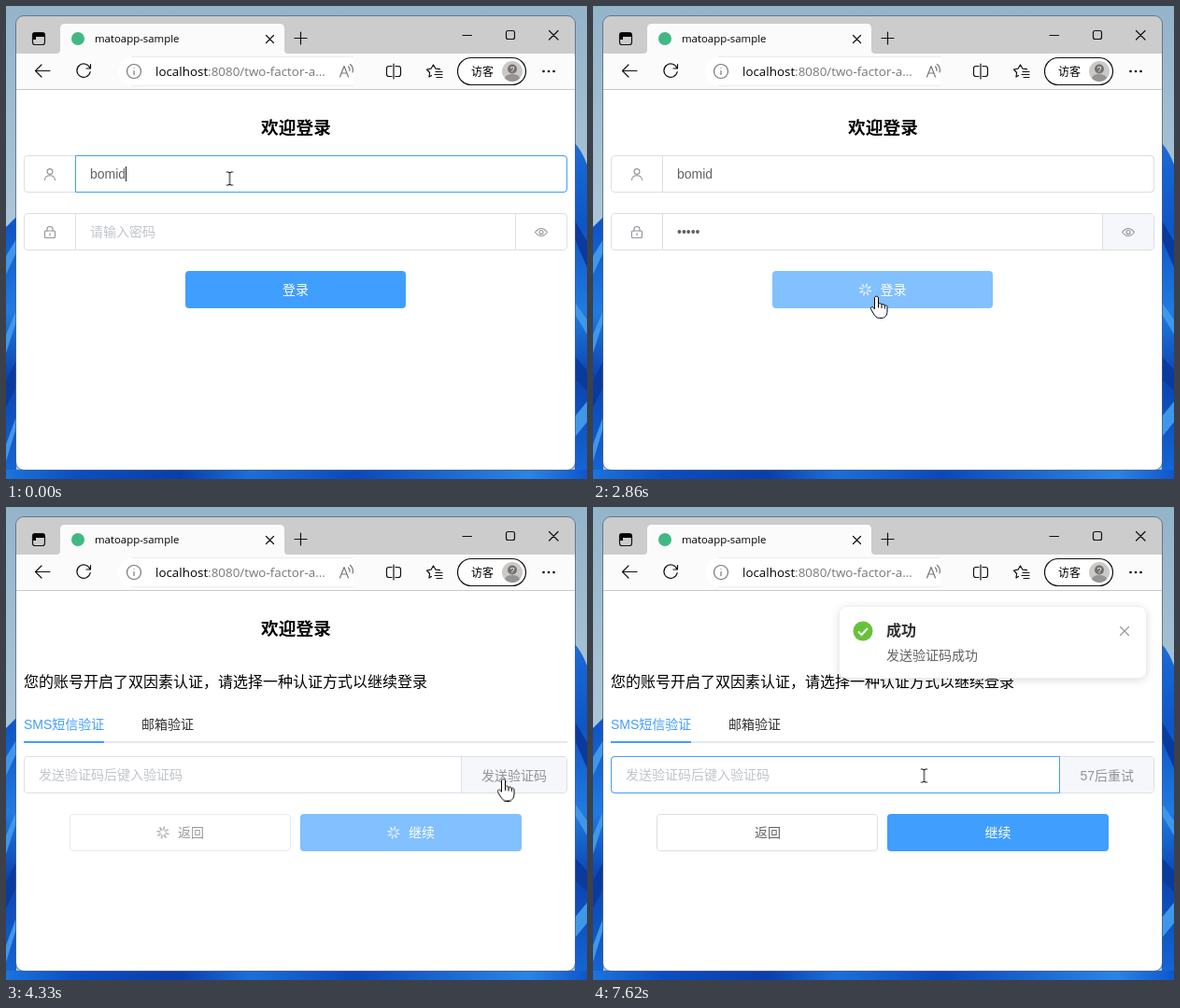
An HTML page that plays this animation: 622 px wide and 507 px high, repeating every 8 s.

```html
<!DOCTYPE html>
<html lang="zh-CN">
<head>
<meta charset="utf-8">
<title>Two-factor login</title>
<style>
  html, body { margin: 0; width: 100%; height: 100%; overflow: hidden; }
  svg { display: block; width: 622px; height: 507px; }
  text { font: 14px "Liberation Sans", "Noto Sans CJK SC", "Noto Sans CJK JP", sans-serif; white-space: pre; }
  .ui { font-family: "Open Sans", "Noto Sans CJK SC", sans-serif; }
  .line { fill: none; stroke: #111; stroke-width: 1.2; stroke-linecap: round; stroke-linejoin: round; }
  .soft { stroke: #777; }
  .icon { fill: none; stroke: #909399; stroke-width: 1.1; stroke-linecap: round; stroke-linejoin: round; }
  .box { fill: #fff; stroke: #dcdfe6; }
  .blue { fill: #409eff; }
  .focus { fill: none; stroke: #409eff; }
  .caret { fill: #222; }
  .hint { fill: #c0c4cc; }
  .text { fill: #606266; }
  .muted { fill: #909399; }
  .white { fill: #fff; }
  .pointer { fill: #fff; stroke: #000; stroke-linejoin: round; }
</style>
</head>
<body>
<svg viewBox="0 0 622 507" xmlns="http://www.w3.org/2000/svg">
  <defs>
    <linearGradient id="sky" x2="0" y2="1">
      <stop stop-color="#94b4ca"/><stop offset=".45" stop-color="#aac5d7"/>
    </linearGradient>
    <linearGradient id="petal" x2="0" y2="1">
      <stop stop-color="#1a6bd8"/><stop offset=".25" stop-color="#0d55c8"/><stop offset=".5" stop-color="#1f7be2"/>
      <stop offset=".7" stop-color="#0a43b2"/><stop offset="1" stop-color="#1568d8"/>
    </linearGradient>
    <linearGradient id="floor">
      <stop stop-color="#1b74dd"/><stop offset=".12" stop-color="#0b4ec3"/><stop offset=".3" stop-color="#0a3eab"/>
      <stop offset=".42" stop-color="#1b6fdb"/><stop offset=".6" stop-color="#0b48bb"/>
      <stop offset=".9" stop-color="#2a84e6"/><stop offset="1" stop-color="#0f56ca"/>
    </linearGradient>
    <filter id="shade" x="-10%" y="-25%" width="120%" height="160%">
      <feDropShadow dx="0" dy="2" stdDeviation="4" flood-opacity=".13"/>
    </filter>
    <clipPath id="frame"><rect x="11" y="11" width="598" height="486" rx="8"/></clipPath>
    <path id="spokes" d="M0-3V-6M2.1-2.1 4.3-4.3M3 0H6M2.1 2.1 4.3 4.3M0 3V6M-2.1 2.1-4.3 4.3M-3 0H-6M-2.1-2.1-4.3-4.3" stroke-width="1.3" stroke-linecap="round"/>
  </defs>

  <!-- desktop -->
  <rect width="622" height="507" fill="url(#sky)"/>
  <path fill="url(#petal)" d="M0 237 11 226V507H0ZM609 147Q617 156 622 170V507H609Z"/>
  <path fill="#3f97ea" d="M0 268 11 250V264L0 288ZM0 352 11 326V338L0 372ZM0 470 11 440V452L0 488ZM609 318 622 336V352L609 330ZM609 440 622 424V446L609 462Z"/>
  <path fill="#083a9f" d="M0 402 11 380V408L0 430ZM609 230 622 252V280L609 250ZM609 376 622 390V412L609 400Z"/>
  <rect y="497" width="622" height="10" fill="url(#floor)"/>

  <!-- browser window -->
  <g clip-path="url(#frame)">
    <rect x="11" y="11" width="598" height="486" fill="#fff"/>
    <rect x="11" y="11" width="598" height="40" fill="#cccccc"/>
    <path fill="#fbfbfb" d="M11 51H54Q58 51 58 47V24Q58 19 63 19H293Q298 19 298 24V47Q298 51 302 51H609V90H11Z"/>
    <path fill="#fff" d="M136 54H372V86H136A16 16 0 0 1 136 54Z"/>
    <path stroke="#ececec" d="M134 54.5H372M134 85.5H372"/>
    <path stroke="#c9c9c9" d="M11 89.5H609"/>
    <rect class="line" x="28.5" y="28.5" width="13" height="13" rx="2.5"/>
    <path d="M29 29H41V33H29ZM29 32H32V36H29Z"/>
    <circle cx="77" cy="35" r="7" fill="#41b883"/>
    <text class="ui" x="95" y="39" style="font-size:11.4px">matoapp-sample</text>
    <path class="line" d="M278.5 31.5 286.5 39.5M286.5 31.5 278.5 39.5M309 34.5H322M315.5 28V41"/>
    <path class="line" stroke-width="1" d="M489 31.5H498.500M581.500 26.500 591 36M591 26.500 581.500 36"/>
    <rect class="line" x="535.500" y="26.500" width="9" height="9" rx="2"/>
    <path class="line" d="M47 69.500H31.500M38 63 31.500 69.500 38 76"/>
    <path class="line" d="M90 67A7.200 7.200 0 1 0 90.200 70.500M90.500 62.500V67H86"/>
    <circle class="line soft" cx="137" cy="70" r="7.500"/>
    <path class="line soft" d="M137 69.500V73.500M137 66.500V66.600"/>
    <text class="ui" x="160" y="75" style="font-size:13.4px">localhost<tspan fill="#777">:8080/two-factor-a...</tspan></text>
    <path class="line soft" d="M357.500 76 362 64.500 366.500 76M359 72H365M366.500 65Q368.500 67 368 69.500M368.500 62.500Q372.500 66 371 71"/>
    <path class="line" d="M413 64.500H410Q407.500 64.500 407.500 67V73Q407.500 75.500 410 75.500H413M417 64.500H420Q422.500 64.500 422.500 67V73Q422.500 75.500 420 75.500H417M415 62V78"/>
    <path class="line" d="M455.500 74.500 453 76 453.600 71.500 450.500 68 455 67.200 457.500 63 460 67.200 464.500 67.700M460 70.500H467M459 73.500H467M461 76.500H467"/>
    <rect class="line" x="483.500" y="55.500" width="73" height="29" rx="14.500" style="fill:#fff"/>
    <text class="ui" x="498" y="74.500" style="font-size:12px">访客</text>
    <circle cx="542" cy="70" r="11" fill="#cbc9c7"/>
    <path fill="#969492" d="M534 77.500Q535 73 542 73T550 77.500A11 11 0 0 1 534 77.500Z"/>
    <circle cx="542" cy="67.500" r="5" fill="#75716e"/>
    <text class="white" x="542" y="71" text-anchor="middle" style="font-size:9px">?</text>
    <circle cx="575.500" cy="70" r="1.300"/><circle cx="581" cy="70" r="1.300"/><circle cx="586.500" cy="70" r="1.300"/>

    <text x="310.500" y="137" text-anchor="middle" style="font-size:18.72px;font-weight:700">欢迎登录</text>

    <!-- login form -->
    <g id="login">
      <rect class="box" x="19.500" y="160.500" width="581" height="39" rx="3.500"/>
      <rect class="box" x="19.500" y="222.500" width="581" height="39" rx="3.500"/>
      <path id="eyeCell" fill="#f5f7fa" d="M546 223H597Q600 223 600 226V258Q600 261 597 261H546Z"/>
      <path stroke="#dcdfe6" d="M74.500 161V199M74.500 223V261M545.500 223V261"/>
      <path id="userBox" class="focus" d="M74.500 160.500H597Q600.500 160.500 600.500 164V196Q600.500 199.500 597 199.500H74.500Z"/>
      <rect id="passBox" class="focus" x="74.500" y="222.500" width="471" height="39"/>
      <g class="icon">
        <circle cx="47" cy="177.500" r="2.900"/><path d="M41.500 186.500Q42 181.800 47 181.800T52.500 186.500"/>
        <rect x="41.500" y="241" width="11" height="7.500" rx="1"/><path d="M44 241V239Q44 236.500 47 236.500T50 239V241M47 243.500V246"/>
        <path d="M566.500 242.500Q573 234.500 579.500 242.500Q573 250.500 566.500 242.500Z"/><circle cx="573" cy="242.500" r="2"/>
      </g>
      <text class="text" x="90" y="185">bomid</text>
      <rect id="userCaret" class="caret" x="128" y="172" width="1" height="16"/>
      <text id="passHint" class="hint" x="90" y="247">请输入密码</text>
      <g id="dots" class="text"></g>
      <rect id="passCaret" class="caret" x="90" y="234" width="1" height="16"/>
      <rect id="loginBtn" class="blue" x="192" y="284" width="236" height="40" rx="4"/>
      <text id="loginText" class="white" x="310" y="309" text-anchor="middle">登录</text>
      <g id="loginBusy">
        <text class="white" x="307.500" y="309">登录</text>
        <g transform="translate(291.500 304)"><use class="spin" href="#spokes" stroke="#fff"/></g>
        <rect x="191" y="283" width="238" height="42" rx="4" fill="#fff" opacity=".35"/>
      </g>
    </g>

    <!-- verification form -->
    <g id="verify">
      <text x="19" y="193" style="font-size:16px">您的账号开启了双因素认证，请选择一种认证方式以继续登录</text>
      <text x="19" y="238" fill="#409eff">SMS短信验证</text>
      <text x="145" y="238" fill="#303133">邮箱验证</text>
      <rect x="19" y="251" width="582" height="2" fill="#e4e7ed"/>
      <rect class="blue" x="19" y="251" width="86" height="2"/>
      <rect class="box" x="19.500" y="267.500" width="581" height="39" rx="3.500"/>
      <g id="sendCell">
        <path fill="#f5f7fa" d="M488 268H597Q600 268 600 271V303Q600 306 597 306H488Z"/>
        <path stroke="#dcdfe6" d="M487.500 268V306"/>
        <text class="muted" x="509" y="293">发送验证码</text>
      </g>
      <g id="waitCell">
        <path fill="#f5f7fa" d="M500 268H597Q600 268 600 271V303Q600 306 597 306H500Z"/>
        <path stroke="#dcdfe6" d="M499.500 268V306"/>
        <text class="muted" id="n60" x="521.500" y="293">60</text>
        <text class="muted" id="n59" x="521.500" y="293">59</text>
        <text class="muted" id="n58" x="521.500" y="293">58</text>
        <text class="muted" id="n57" x="521.500" y="293">57</text>
        <text class="muted" x="537" y="293">后重试</text>
      </g>
      <path id="codeBox" class="focus" d="M23 267.500H499.500V306.500H23Q19.500 306.500 19.500 303V271Q19.500 267.500 23 267.500Z"/>
      <text class="hint" x="35" y="292">发送验证码后键入验证码</text>
      <rect id="codeCaret" class="caret" x="35" y="279" width="1" height="16"/>
      <rect class="box" x="68.500" y="329.500" width="236" height="39" rx="3.500"/>
      <rect class="blue" x="315" y="329" width="237" height="40" rx="4"/>
      <g id="ready">
        <text class="text" x="173" y="354">返回</text>
        <text class="white" x="419.500" y="354">继续</text>
      </g>
      <g id="busy">
        <text class="text" x="184" y="354">返回</text>
        <text class="white" x="431" y="354">继续</text>
        <g transform="translate(168 349)"><use class="spin" href="#spokes" stroke="#606266"/></g>
        <g transform="translate(415 349)"><use class="spin" href="#spokes" stroke="#fff"/></g>
        <path fill="#fff" opacity=".35" d="M67 328H306V370H67ZM314 328H553V370H314Z"/>
      </g>
    </g>

    <!-- notification -->
    <g id="notice">
      <rect x="263.500" y="106.500" width="329" height="77" rx="8" fill="#fff" stroke="#ebeef5" filter="url(#shade)"/>
      <circle cx="289" cy="133" r="10.500" fill="#67c23a"/>
      <path d="M284 133.500 287.500 137 294 130" fill="none" stroke="#fff" stroke-width="2"/>
      <text x="314" y="138" fill="#303133" style="font-size:16px;font-weight:700">成功</text>
      <text class="text" x="314" y="164">发送验证码成功</text>
      <path class="icon" d="M564.500 128.500 573.500 137.500M573.500 128.500 564.500 137.500"/>
    </g>
  </g>
  <rect x="10.500" y="10.500" width="599" height="487" rx="8.500" fill="none" stroke="#55626e" stroke-opacity=".75"/>

  <!-- pointers -->
  <path id="beam" fill="none" stroke="#000" d="M-3.500-7H-1L0-6 1-7H3.500M0-6V6M-3.500 7H-1L0 6 1 7H3.500"/>
  <path id="arrow" class="pointer" d="M.5.5V16.500L4.200 13 6.700 18.700 9.200 17.600 6.800 12H11.800Z"/>
  <path id="hand" class="pointer" d="M-2.500 2C-2.500-.5 1.500-.5 1.500 2V8.500C2.500 7.300 5 7.600 5 9.300C6 8.200 8.200 8.600 8.300 10.200C9.500 9.400 11 10 11 11.800V16C11 20 9 23.500 5 23.500H2.500C-.5 23.500-2 21.500-3.500 19L-6.300 14.200C-7.500 12-5 10.800-3.700 12.400L-2.500 14ZM1.500 8.500V12.500M5 9.300V13M8.300 10.200V13.500"/>
</svg>
<script>
const LOOP = 8000;
const byId = id => document.getElementById(id);
const move = (x, y) => `translate(${x}px, ${y}px)`;

// Hold each [time, style] until the next one.
function track(el, steps) {
  const frames = steps.map(([t, style]) => ({ ...style, offset: t / LOOP, easing: 'step-end' }));
  frames.push({ ...steps.at(-1)[1], offset: 1 });
  el.animate(frames, { duration: LOOP, iterations: Infinity });
}

// Times alternate between appearing and vanishing.
function show(el, ...times) {
  const steps = times.map((t, i) => [t, { opacity: i % 2 ? 0 : 1 }]);
  if (times[0] > 0) steps.unshift([0, { opacity: 0 }]);
  track(el, steps);
}

const spans = {
  login: [0, 2980],
  verify: [2980],
  userCaret: [0, 150, 740, 880],
  eyeCell: [880],
  passHint: [0, 1430],
  passBox: [880, 2700],
  passCaret: [880, 2700],
  loginText: [0, 2700],
  loginBusy: [2700, 2980],
  sendCell: [0, 4590],
  waitCell: [4590],
  n60: [4590, 5430],
  n59: [5430, 6390],
  n58: [6390, 7370],
  n57: [7370],
  busy: [0, 4590],
  ready: [4590],
  codeBox: [5000],
  codeCaret: [5000, 5430, 5990, 6540, 7100, 7620],
  notice: [4590]
};
for (const id in spans) show(byId(id), ...spans[id]);

// Password typing
const keys = [1430, 1710, 1830, 2110, 2260], pitch = 4.9;
keys.forEach((t, i) => {
  const dot = document.createElementNS('http://www.w3.org/2000/svg', 'text');
  dot.setAttribute('x', 90 + i * pitch);
  dot.setAttribute('y', 247);
  dot.textContent = '•';
  byId('dots').append(dot);
  show(dot, t);
});
track(byId('passCaret'), [0, ...keys].map((t, i) => [t, { transform: move(Math.round(i * pitch), 0) }]));

track(byId('userBox'), [
  [0, { stroke: '#409eff' }], [880, { stroke: '#c0c4cc' }],
  [2410, { stroke: '#cdd0d8' }], [2560, { stroke: '#dcdfe6' }]
]);
track(byId('loginBtn'), [[0, { fill: '#409eff' }], [2560, { fill: '#66b1ff' }], [2700, { fill: '#409eff' }]]);
track(byId('notice'), [
  [0, { transform: move(346, 0) }], [4590, { transform: move(210, 0) }],
  [4730, { transform: move(28, 0) }], [4860, { transform: move(0, 0) }]
]);

const ticks = [0, 2840, 2980, 3100, 3250, 3380, 3520, 3650, 3780, 3920, 4050, 4180, 4330, 4450];
document.querySelectorAll('.spin').forEach(el =>
  track(el, ticks.map(t => [t, { transform: `rotate(${t * 0.18}deg)` }])));

const path = [
  [0, 'beam', 239.5, 185], [880, 'beam', 235.5, 185],
  [2260, 'beam', 254.5, 202], [2410, 'beam', 303.5, 279.5],
  [2560, 'hand', 304, 303], [2700, 'hand', 304, 311], [2980, 'arrow', 304, 311],
  [3250, 'arrow', 310, 311], [3380, 'arrow', 332, 310], [3520, 'arrow', 374, 308],
  [3650, 'beam', 436.5, 301], [3780, 'hand', 500, 296], [3920, 'hand', 522, 293], [4050, 'hand', 533, 291.5],
  [4730, 'hand', 516, 292], [4860, 'beam', 426.5, 290], [5000, 'beam', 354.5, 288]
];
for (const kind of ['beam', 'arrow', 'hand'])
  track(byId(kind), path.map(([t, k, x, y]) => [t, { opacity: +(k === kind), transform: move(x, y) }]));
</script>
</body>
</html>
```
